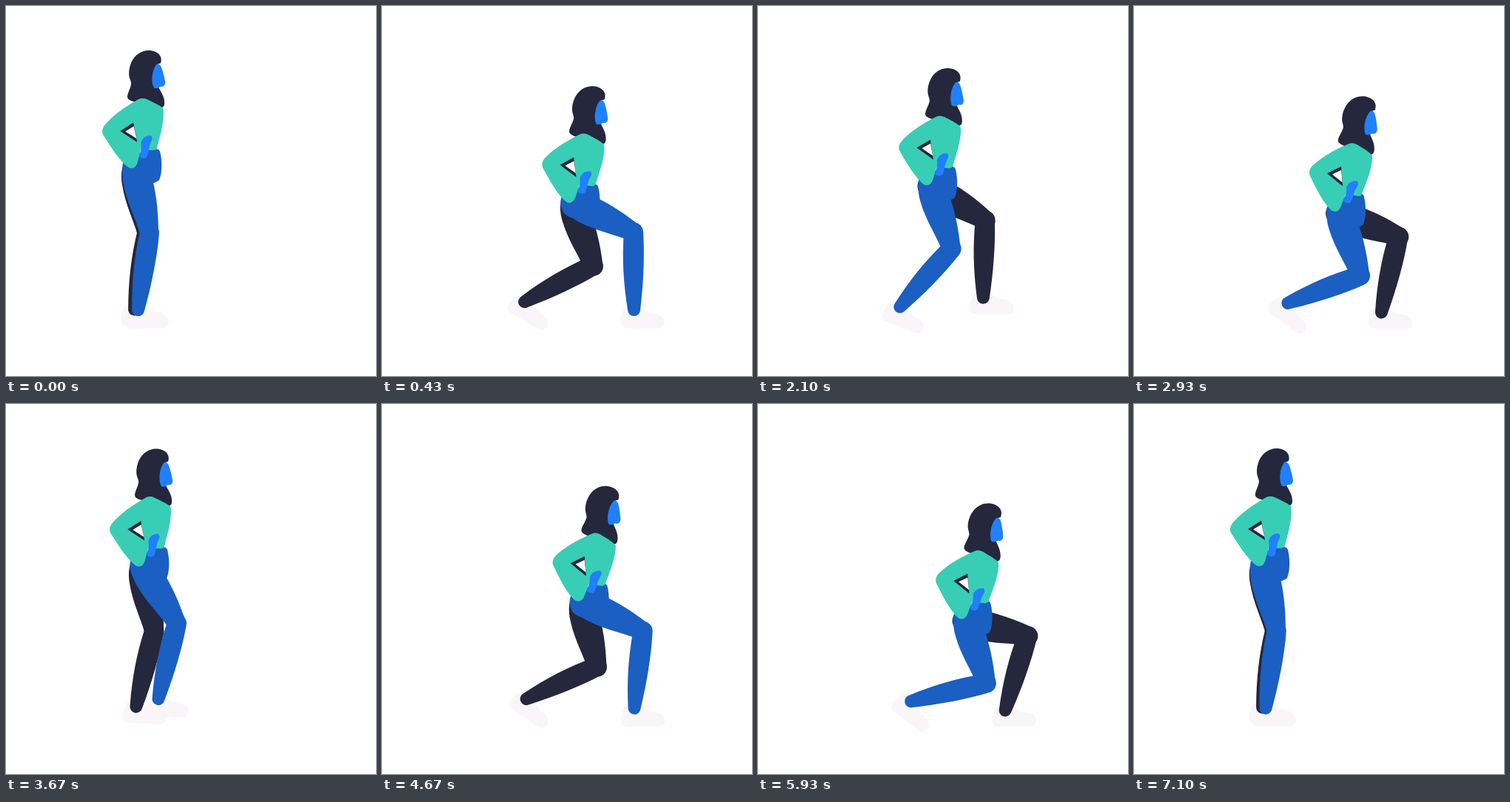
An HTML page without scripts that plays this animation: 500 px wide and 500 px high, repeating every 7130 ms.

```html
<!DOCTYPE html>
<html lang="en">
<head>
<meta charset="utf-8">
<title>Lunges</title>
<style>
@property --hx { syntax: '<number>'; inherits: true; initial-value: 0; }
@property --hy { syntax: '<number>'; inherits: true; initial-value: 0; }
@property --lean { syntax: '<number>'; inherits: true; initial-value: 0; }
@property --ax { syntax: '<number>'; inherits: true; initial-value: 178; }
@property --ay { syntax: '<number>'; inherits: true; initial-value: 411; }
@property --tilt { syntax: '<number>'; inherits: true; initial-value: 0; }

html, body { margin: 0; width: 100%; height: 100%; overflow: hidden; background: #fff; }
svg { display: block; width: 100vw; height: 100vh; }

svg, .near, .far {
  animation-duration: 3565ms;
  animation-delay: -15ms;
  animation-iteration-count: infinite;
  animation-timing-function: cubic-bezier(.333, 0, .667, 1);
}
svg { animation-name: hip-x, hip-y, lean; }
.near { animation-name: near-x, near-y, near-tilt; fill: #1b5fc2; --px: 174; --py: 218; --a: 91; --b: 105; }
.far { animation-name: far-x, far-y, far-tilt; fill: #25273d; --px: 173; --py: 221; --a: 87; --b: 102; }

/* hip travel */
@keyframes hip-x {
  0%, 42.5%, 50%, 95.23%, 100% { --hx: 0; }
  17.8%, 28.8%, 67.5%, 80.93% { --hx: 107; }
}
@keyframes hip-y {
  0%, 2.66%, 41.37%, 53.02%, 94.25%, 100% { --hy: 0; }
  21.2%, 23.14%, 71.5%, 75.88% { --hy: 87; }
}
@keyframes lean {
  0%, 2.66%, 42.5%, 52%, 95.23%, 100% { --lean: 0; }
  21.46%, 30.5%, 70.5%, 82% { --lean: 6.3; }
}

/* ankles: one steps out while the other rolls on its toe */
@keyframes near-x {
  0%, 42.08%, 50%, 95.23%, 100% { --ax: 178; }
  12.9%, 31.84% { --ax: 341; }
  70.13%, 80.93% { --ax: 209; }
}
@keyframes near-y {
  0%, 12.9%, 31.84%, 42.08%, 50%, 95.23%, 100% { --ay: 411; }
  7.29% { --ay: 383; }
  36.89% { --ay: 395; }
  70.13%, 80.93% { --ay: 401; }
}
@keyframes near-tilt {
  0%, 50%, 95.23%, 100% { --tilt: 0; }
  67.32%, 80.93% { --tilt: 38; }
}
@keyframes far-x {
  0%, 42.5%, 50%, 95.23%, 100% { --ax: 174; }
  17.8%, 28.47% { --ax: 201; }
  62.97%, 84.57% { --ax: 335; }
}
@keyframes far-y {
  0%, 42.5%, 50%, 95.23%, 100% { --ay: 407; }
  17.8%, 28.47% { --ay: 396; }
  57.36% { --ay: 383; }
  62.97%, 84.57% { --ay: 411; }
  89.9% { --ay: 393; }
}
@keyframes far-tilt {
  0%, 42.5%, 100% { --tilt: 0; }
  17.8%, 28.47% { --tilt: 38; }
}

/* two-bone leg: hip and knee angles follow from hip and ankle */
.leg {
  --x: calc(var(--px) + var(--hx));
  --y: calc(var(--py) + var(--hy));
  --dx: calc(var(--ax) - var(--x));
  --dy: calc(var(--ay) - var(--y));
  --d: hypot(var(--dx), var(--dy));
  --aa: calc(var(--a) * var(--a));
  --bb: calc(var(--b) * var(--b));
  --dd: calc(var(--dx) * var(--dx) + var(--dy) * var(--dy));
}
.thigh {
  transform: translate(calc(var(--x) * 1px), calc(var(--y) * 1px))
    rotate(calc(atan2(var(--dy), var(--dx)) - acos(min(1, (var(--aa) + var(--dd) - var(--bb)) / (2 * var(--a) * var(--d))))));
}
.shin {
  transform: translate(calc(var(--a) * 1px), 0px)
    rotate(calc(180deg - acos(max(-1, (var(--aa) + var(--bb) - var(--dd)) / (2 * var(--a) * var(--b))))));
}
.shoe {
  fill: #faf5f8;
  transform: translate(calc(var(--ax) * 1px), calc(var(--ay) * 1px)) rotate(calc(var(--tilt) * 1deg));
}
.body { transform: translate(calc(var(--hx) * 1px), calc(var(--hy) * 1px)); }
.torso { transform-origin: 185px 205px; transform: rotate(calc(var(--lean) * 1deg)); }
.ink { fill: #25273d; }
.skin { fill: #2080ff; }
</style>
</head>
<body>
<svg viewBox="0 0 500 500">
  <defs>
    <path id="thigh" d="M0-17C20-22 55-20 88-13A13 13 0 0 1 88 13C68 14 45 21 18 20C-6 19-17 10-17 0C-17-10-10-16 0-17Z"/>
    <path id="shin" d="M0-13C30-15 70-13 105-8.500A8.500 8.500 0 0 1 105 8.500C70 14 35 16 0 13A13 13 0 0 1 0-13Z"/>
    <path id="shoe" d="M-12-2C-18 5-20 16-17 22Q-15 25-6 25L33 25Q42 24 41 15C40 8 33 6 24 5C15 4 11-2 6-4Z"/>
  </defs>

  <g class="far"><use class="shoe" href="#shoe"/></g>
  <g class="near"><use class="shoe" href="#shoe"/></g>

  <g class="far">
    <g class="leg"><g class="thigh"><use href="#thigh"/><g class="shin"><use href="#shin"/></g></g></g>
  </g>
  <g class="near">
    <g class="leg"><g class="thigh"><use href="#thigh"/><g class="shin"><use href="#shin"/></g></g></g>
  </g>

  <g class="body">
    <path fill="#1b5fc2" d="M161 207L190 195Q206 190 208 197C211 210 211 224 207 235C198 244 167 243 160 230C156 222 156 212 161 207Z"/>
    <g class="torso">
      <path class="ink" d="M209 77C212 67 204 60 192 60C175 61 166 76 166 92C166 98 169 101 169 105C168 112 163 119 164 124C166 129 175 129 180 132L208 137Q214 138 214 131C214 122 209 116 206 110L200 90L204 79Z"/>
      <path class="skin" d="M203 79Q206 77 209 81C212 88 214 97 215 103Q215 108 211 109L208 109Q206 112 200 111C196 105 196 88 203 79Z"/>
      <path fill="#38ceb5" d="M177 127Q183 123 190 126C198 130 206 133 212 138C215 152 208 176 204 191Q203 195 198 195L182 194L177 213Q173 222 165 218C153 209 141 190 131 174Q128 168 133 161C145 147 161 136 177 127Z"/>
      <path class="ink" d="M154 169L172 157.500L173 163L177 184Z"/>
      <path fill="#fff" d="M161 169.500L172.500 162.500L176 179Z"/>
      <path class="skin" d="M182 185C184 178 189 175 195 175Q198 176 197 181C193 188 193 195 191 202Q190 206 185 206Q179 205 180 201C183 195 183 190 182 185Z"/>
    </g>
  </g>
</svg>
</body>
</html>
```
